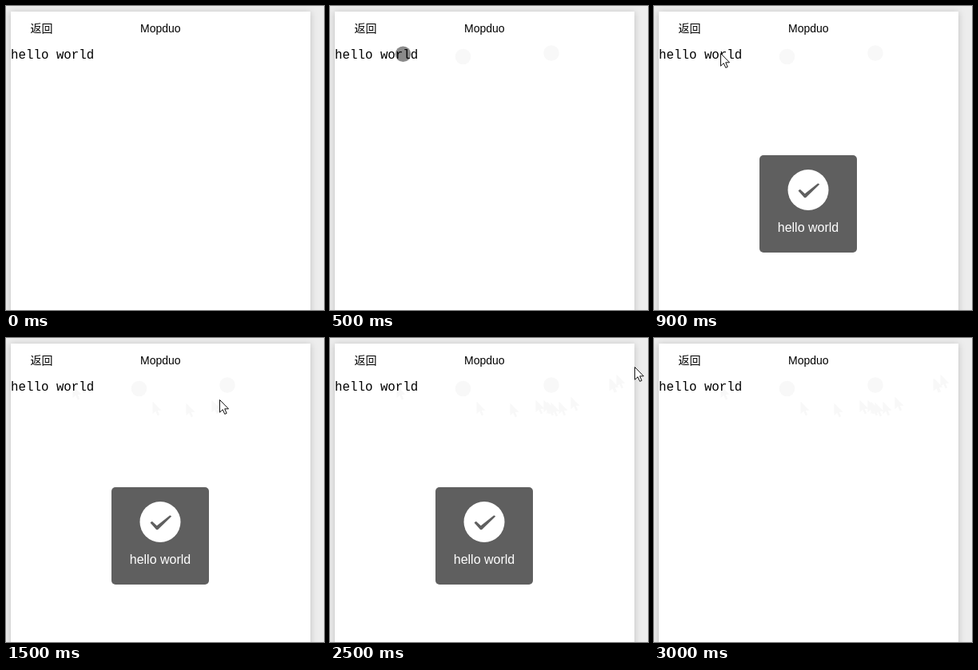
These frames come from a looping animation (398 px wide and 381 px high, 3400 ms). An HTML page:

```html
<!DOCTYPE html>
<html lang="zh">
<head>
<meta charset="utf-8">
<title>Toast demo</title>
<style>
  html, body { margin: 0; width: 100%; height: 100%; overflow: hidden; background: #ededed; }
  svg { display: block; }
  .panel { fill: #fff; filter: drop-shadow(0 1px 4px rgba(0, 0, 0, .2)); }
  .bar { font: 14px "Liberation Sans", "Noto Sans CJK SC", "Noto Sans CJK", sans-serif; }
  .page { font: 15.8px "Liberation Mono", monospace; }
  .label { font: 16px "Liberation Sans", sans-serif; fill: #fff; text-anchor: middle; }
  .trail { fill: #f8f8f8; }
  .touch { fill: rgba(0, 0, 0, .46); }
  .arrow { fill: #fff; stroke: #111; stroke-width: 1; }
</style>
</head>
<body>
<svg width="398" height="381" viewBox="0 0 398 381">
  <defs>
    <circle id="touch" r="9.8"/>
    <path id="arrow" d="M.5 .5V16.2L4.2 12.7L6.8 18.4L9.2 17.3L6.7 11.8H11.5Z"/>
  </defs>
  <rect class="panel" x="6" y="7" width="375" height="390"/>
  <g id="trails"></g>
  <g class="bar">
    <text x="30.5" y="33">返回</text>
    <text x="168" y="33">Mopduo</text>
  </g>
  <text class="page" x="6" y="66">hello world</text>
  <g id="toast">
    <rect x="132" y="187" width="122" height="122" rx="5" fill="#5f5f5f"/>
    <circle cx="193" cy="230.5" r="25.5" fill="#fff"/>
    <path d="M180.5 231.5L182.8 229.7L188.8 235.2L205.2 222.2L207.2 223.5L190 240.2H188.2Z" fill="#5f5f5f"/>
    <text class="label" x="193" y="283">hello world</text>
  </g>
  <g id="pointer"></g>
</svg>
<script>
const LOOP = 3400;
const TOAST = { from: 800, to: 2700 };

// Pointer samples: start time, shape, x, y
const samples = [
  [100, "touch", 277, 59], [200, "touch", 166.5, 63.5], [300, "touch", 98, 62],
  [400, "touch", 94, 61], [500, "touch", 91.5, 60.3], [600, "touch", 83, 60],
  [900, "arrow", 83, 59], [1200, "arrow", 183, 79], [1300, "arrow", 225, 81],
  [1400, "arrow", 257, 77], [1500, "arrow", 267, 77], [1600, "arrow", 271, 79],
  [1700, "arrow", 276, 80], [1800, "arrow", 286, 79], [2100, "arrow", 301, 73],
  [2200, "arrow", 349, 50], [2300, "arrow", 350, 50], [2400, "arrow", 358, 45],
  [2500, "arrow", 381, 36], [3000, "none"]
];

const byId = id => document.getElementById(id);
const trails = byId("trails"), toast = byId("toast"), pointer = byId("pointer");

const mark = ([, shape, x, y], style) =>
  `<use href="#${shape}" x="${x}" y="${y}" class="${style}"/>`;

// Touches over the page text and the exit outside the panel leave no trail.
const leavesTrail = ([, shape, x]) =>
  shape === "touch" ? x > 100 : x < 381;

let shown = -1;

function render(time) {
  toast.style.display = time >= TOAST.from && time < TOAST.to ? "" : "none";
  const count = samples.filter(([start]) => start <= time).length;
  if (count === shown) return;
  shown = count;
  const current = samples[count - 1];
  trails.innerHTML = samples.slice(0, Math.max(0, count - 1))
    .filter(leavesTrail).map(s => mark(s, "trail")).join("");
  pointer.innerHTML = current && current[1] !== "none" ? mark(current, current[1]) : "";
}

const begin = performance.now();

function tick() {
  render((performance.now() - begin) % LOOP);
  requestAnimationFrame(tick);
}
tick();
</script>
</body>
</html>
```
